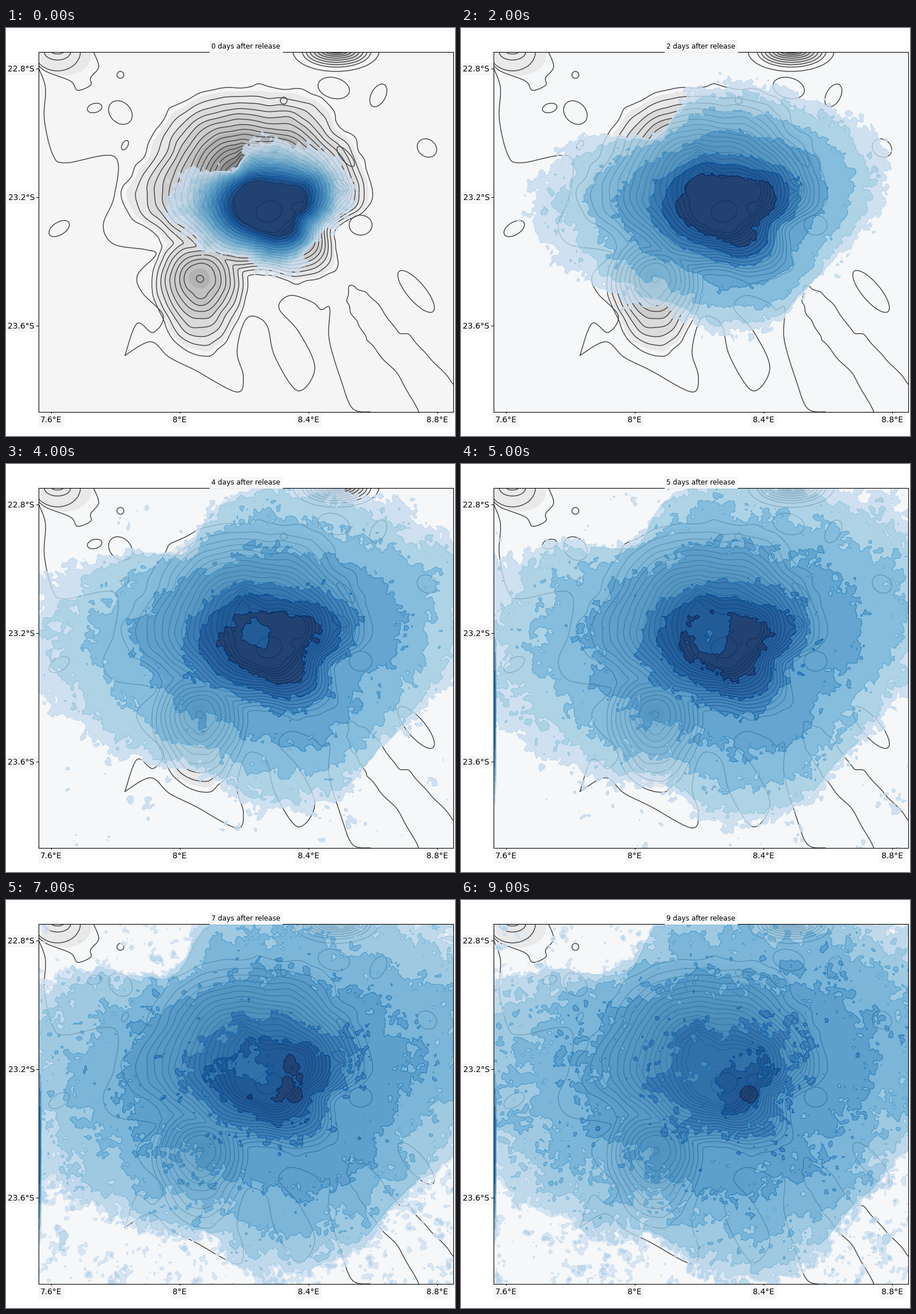
These frames come from a looping animation (785 px wide and 714 px high, 10000 ms). A matplotlib script:

```python
import numpy as np
import matplotlib.pyplot as plt
from matplotlib.animation import FuncAnimation
from matplotlib.patches import Ellipse

W, H, DPI = 785, 714, 100
L, R, T, B = 57, 782, 42, 672
INK = "#454545"

fig = plt.figure(figsize=(W / DPI, H / DPI), dpi=DPI, facecolor="white")
ax = fig.add_axes([L / W, 1 - B / H, (R - L) / W, (B - T) / H])
ax.set(xlim=(L, R), ylim=(B, T), xticks=[], yticks=[])

X, Y = np.meshgrid(np.linspace(L, R, 291), np.linspace(T, B, 253))


def curve(pts, closed=False, n=8):
    """Catmull-Rom spline through the points."""
    p = np.asarray(pts, float)
    q = np.concatenate([p[-1:], p, p[:2]] if closed else [p[:1], p, p[-1:]])
    t = (np.arange(n) / n).reshape((1, n) + (1,) * (p.ndim - 1))
    a, b, c, d = [q[i:len(q) - 3 + i, None] for i in range(4)]
    out = 0.5 * (2 * b + (c - a) * t + (2 * a - 5 * b + 4 * c - d) * t**2
                 + (3 * b - a - 3 * c + d) * t**3)
    return np.concatenate([out.reshape((-1,) + p.shape[1:]),
                           p[:1] if closed else p[-1:]])


def trace(*pts, wiggle=0):
    x, y = curve(pts).T
    s = np.arange(len(x))
    ax.plot(x + wiggle * np.sin(0.9 * s), y + wiggle * np.sin(0.6 * s + 1),
            color=INK, lw=1.05, zorder=1)


def oval(x, y, w, h, tilt=0, face="none", edge=INK):
    ax.add_patch(Ellipse((x, y), w, h, angle=tilt, fc=face, ec=edge, lw=1.05, zorder=1))


def noise(rng, size):
    """Smooth unit-variance noise with the given grain in cells."""
    k2 = np.fft.fftfreq(X.shape[0])[:, None]**2 + np.fft.fftfreq(X.shape[1])**2
    z = np.fft.ifft2(np.fft.fft2(rng.standard_normal(X.shape))
                     * np.exp(-2 * (np.pi * size)**2 * k2)).real
    return z / z.std()


def radial(cx, cy, rings):
    """Field equal to 1, 2, 3... on nested rings, given as radii by bearing."""
    r = np.hypot(X - cx, Y - cy)
    ang = np.arctan2(Y - cy, X - cx)
    rs = []
    for ring in rings:
        c = curve(ring, True)
        rs.append(np.interp(ang, np.linspace(0, 2 * np.pi, len(c)), c, period=2 * np.pi))
    rs.append(np.zeros_like(r))
    f = 1 - np.maximum(r - rs[0], 0) / 30
    for a, b in zip(rs, rs[1:]):
        f = f + np.clip((a - r) / np.maximum(a - b, 0.5), 0, 1)
    return f


def bump(x, y, w, h, power=1):
    return np.exp(-(((X - x) / w)**2 + ((Y - y) / h)**2)**power)


# Outlines are radii clockwise from east, 22.5 degrees apart
foot = np.array([190, 137, 173, 155, 131, 150, 170, 190,
                 242, 222, 226, 210, 196, 200, 187, 184])
summit = np.array([70, 62, 60, 62, 55, 50, 52, 52, 50, 62, 66, 58, 42, 44, 56, 76])
outer = np.array([1.12, 0.98, 0.92, 0.98, 0.97, 0.87, 1, 1.15,
                  1.3, 1.13, 0.77, 0.85, 0.93, 0.97, 1.06, 1.2])
inner = np.array([1.3, 1.02, 1.2, 1.08, 0.9, 0.85, 0.9, 1.02,
                  1.1, 1.02, 0.95, 0.85, 0.75, 0.78, 0.95, 1.3])


def sea_floor():
    mount = radial(450, 300, [foot + (summit - foot) * s**0.8
                              for s in np.linspace(0, 1, 17)])
    dy = Y - 440
    d = np.hypot(X - 340, dy / (1 + 0.0047 * np.maximum(dy, 0)))
    cone = np.interp(d, [0, 5, 28, 84, 900], [10, 9, 8, 1, -100])
    z = np.logaddexp(4 * mount, 4 * cone) / 4
    z += 1.5 * bump(413, 228, 7, 22) + 2 * bump(588, 285, 14, 12)
    return z + 0.12 * noise(np.random.RandomState(4), 4)


floor = sea_floor()
ax.contourf(X, Y, floor, [1.45, 3, 5, 7, 8.5, 11, 14, 30], zorder=0.4,
            colors=[str(g / 255) for g in (232, 219, 205, 193, 178, 160, 140)])
ax.contour(X, Y, floor, np.arange(1, 18), colors=INK, linewidths=1.05, zorder=1)

# Deep isobath: western bay, southern fingers, eastern canyon
trace((57, 70), (69, 105), (67, 160), (82, 222), (105, 236), (190, 225), (189, 295),
      (170, 345), (188, 378), (245, 388), (262, 397), (230, 432), (238, 463),
      (275, 503), (257, 533), (229, 517), (208, 573))
trace((208, 573), (253, 549), (285, 576), (331, 599), (403, 637), (415, 610),
      (404, 568), (414, 520), (430, 504), (456, 520), (470, 575), (510, 635),
      (540, 595), (512, 532), (477, 490), (497, 468), (536, 480), (551, 493),
      (566, 490), (565, 545), (587, 620), (606, 666), (637, 672))
trace((722, 672), (684, 606), (641, 558), (625, 533), (606, 502), (597, 478),
      (602, 452), (622, 460), (648, 480), (682, 528), (707, 540), (745, 582),
      (783, 622), wiggle=1.3)

# Isolated knolls
for knoll in [(200, 82, 12, 12), (155, 140, 26, 16, -15), (208, 205, 10, 18, 30),
              (93, 351, 40, 22, -32), (200, 148, 36, 46, -45), (485.5, 127, 12, 12),
              (573, 105, 56, 36, 15), (651, 118, 25, 43, 28), (736, 210, 36, 30, 35),
              (717, 461, 92, 32, 50), (594, 225, 44, 16, 50), (620, 345, 40, 35),
              (585, 275, 32, 18, 25), (460, 321, 46, 36, -15)]:
    oval(*knoll)

# Cut-off peaks along the top edge
oval(104, 47, 90, 72, face="#e8e9e8", edge="none")
for w, h in [(80, 66), (46, 28), (20, 7)]:
    oval(90, 42, w, h)
trace((57, 66), (72, 77), (113, 93), (125, 109), (148, 100), (148, 87), (162, 68),
      (153, 42))
oval(577, 41, 150, 70)
for i, s in enumerate(np.linspace(1, 0.2, 8)):
    oval(578, 41, 120 * s, 55 * s**1.4, face=str((236 - 9 * i) / 255))


def outlines(day):
    """Plume outlines: the faint ones spread and settle, the dense ones fade."""
    g = 1 - np.exp(-(day / 3)**1.2)
    grow = [250, 240, 200, 135, 110, 110, 95]
    fade = [0, 0, 0, 0, 9, 12, 14]
    for k in range(7):
        size = 118 - 10.5 * k + grow[k] * g - fade[k] * day
        wide = outer**(1.4 if k == 0 else 1)
        yield size * (wide + (inner - wide) * k / 6)


def tracer(day):
    rng = np.random.RandomState(40 + day)
    age = day / 9
    f = np.minimum(radial(455, 310, list(outlines(day))), 7.3)
    if day > 2:
        # the summit clears while one pocket holds on
        w = day - 3
        f -= min(0.4 * (w + 1), 1.8) * bump(437, 300, 20 + 5 * w, 18 + 4 * w)
        f = np.maximum(f, 7.4 * bump(504, 340, 22, 24, 3))
    fringe = np.exp(-np.maximum(f - 1, 0) / 2)
    grain = 0.5 * noise(rng, 0.8) + 0.6 * noise(rng, 2) + 0.5 * noise(rng, 6)
    f += (0.35 * fringe + 0.22 * age) * grain
    if day >= 5:
        f = np.where(X < 61, np.maximum(f, 5.8 - ((Y - 430) / 75)**2), f)
    return f


def bands(day):
    if day == 0:
        return np.append(np.arange(1, 7.1, 0.5), 30), np.linspace(0.22, 1, 13)
    if day < 6:
        return [1, 2, 3, 4, 5, 6, 7, 30], np.linspace(0.25, 1, 7)
    return [0.55, 1, 2, 3, 4, 5, 6, 7, 30], np.linspace(0.2, 1, 8)


def label(x, y, s, size, **kw):
    box = dict(boxstyle="square,pad=0.3", fc="#f7f7f7", ec="none")
    return ax.text(x, y, s, fontsize=size, family="DejaVu Sans", va="center_baseline",
                   bbox=box, zorder=5, **kw)


for i in range(4):
    x = 79.5 + 225 * i
    ax.plot([x, x], [B, B + 4], color="k", lw=0.8, clip_on=False, zorder=4)
    label(x - 0.8, 685, f"{7.6 + 0.4 * i:.1f}°E".replace(".0", ""), 10, ha="center")
for i in range(3):
    y = 70.5 + 225 * i
    label(50, y, f"{22.8 + 0.4 * i:.1f}°S", 10, ha="right")
    ax.plot([L - 4, L], [y, y], color="k", lw=0.8, clip_on=False, zorder=6)
title = label(419.7, 31, "", 8.64, ha="center")

live = []


def draw(day):
    while live:
        live.pop().remove()
    levels, tones = bands(day)
    cs = ax.contourf(X, Y, tracer(day), levels, colors=plt.cm.Blues(tones),
                     alpha=0.8, zorder=2)
    if day:
        cs.set_edgecolor("face")
        cs.set_linewidth(0.3)
    live.append(cs)
    ax.set_facecolor("#f5f7f8" if day else "#f5f5f5")
    title.set_text(f"{day} days after release")
    return [cs, title]


anim = FuncAnimation(fig, draw, frames=10, interval=1000, repeat=True, repeat_delay=0)
plt.show()
```
